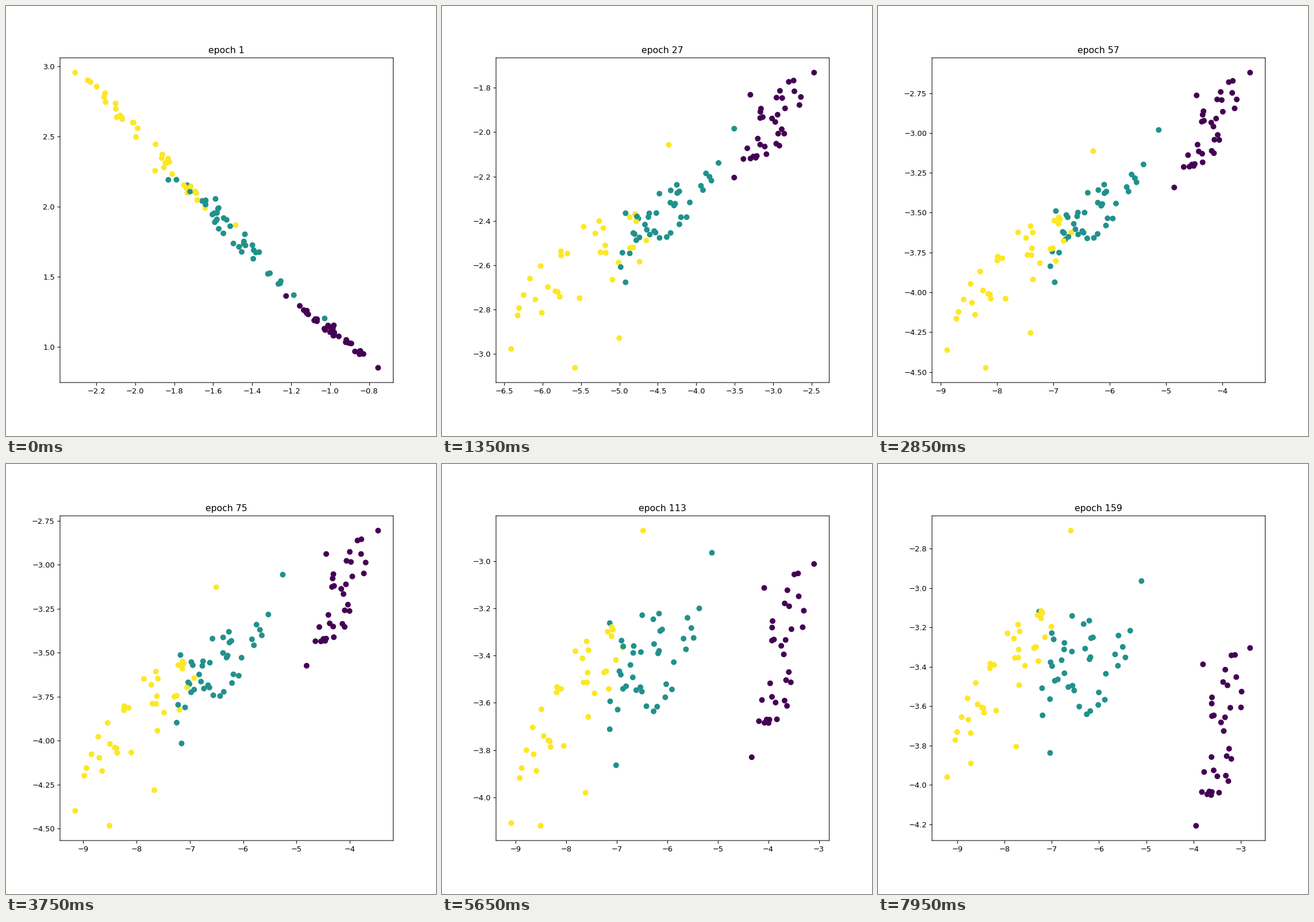
Recreate the animation shown at these times as a matplotlib script. Size 748 px wide and 748 px high, loop 8 s.

```python
import numpy as np
import matplotlib.pyplot as plt
from matplotlib.animation import FuncAnimation

STAGE, DPI = 748, 93.5
FRAMES, INTERVAL = 160, 50
KEY_EPOCHS = np.array([1, 27, 57, 93, 159], float)

# Each class rides on a triangle of outer points, one row per key epoch.
# A fourth point, where given, is a stray that moves on its own.
PURPLE = [
    [(-1.226, 1.363), (-0.754, 0.851), (-0.981, 1.154)],
    [(-3.506, -2.205), (-2.467, -1.731), (-3.296, -1.831)],
    [(-4.853, -3.342), (-3.505, -2.621), (-4.455, -2.764)],
    [(-4.505, -3.661), (-3.232, -2.878), (-4.209, -2.991)],
    [(-3.944, -4.208), (-2.800, -3.305), (-3.797, -3.388)],
]
TEAL = [
    [(-1.830, 2.192), (-1.028, 1.203), (-1.588, 2.056)],
    [(-4.919, -2.678), (-3.506, -1.984), (-4.919, -2.366)],
    [(-6.977, -3.937), (-5.129, -2.981), (-6.957, -3.490)],
    [(-7.000, -3.883), (-5.121, -2.967), (-7.077, -3.334)],
    [(-7.035, -3.838), (-5.100, -2.965), (-7.266, -3.120)],
]
YELLOW = [
    [(-2.308, 2.957), (-1.485, 1.868), (-1.898, 2.257), (-2.095, 2.639)],
    [(-6.407, -2.979), (-4.358, -2.057), (-5.001, -2.930), (-5.577, -3.064)],
    [(-8.888, -4.363), (-6.293, -3.114), (-7.407, -4.255), (-8.203, -4.474)],
    [(-9.024, -4.187), (-6.418, -2.949), (-7.549, -4.068), (-8.407, -4.234)],
    [(-9.215, -3.961), (-6.596, -2.709), (-7.753, -3.806), (-8.714, -3.891)],
]

rng = np.random.default_rng(7)


def cloud(controls, count, center, spread, slope):
    """Control points plus a seeded ellipse of points tied to the triangle."""
    controls = np.array(controls)
    n = count - controls.shape[1]
    radius, angle = np.sqrt(rng.random(n)), 2 * np.pi * rng.random(n)
    du = spread[0] * radius * np.cos(angle)
    dv = spread[1] * radius * np.sin(angle) + slope * du
    u, v = (center[0] + du)[:, None], (center[1] + dv)[:, None]
    a, b, c = (controls[:, k:k + 1] for k in range(3))
    return np.concatenate([controls, a + u * (b - a) + v * (c - a)], axis=1)


classes = [
    (cloud(PURPLE, 34, (0.48, 0.04), (0.40, 0.50), -0.5), "#440154"),
    (cloud(TEAL, 41, (0.37, 0.20), (0.50, 0.40), -0.8), "#21918c"),
    (cloud(YELLOW, 37, (0.40, 0.12), (0.30, 0.50), 0.0), "#fde725"),
]
keys = np.concatenate([points for points, _ in classes], axis=1)
colors = np.concatenate([[color] * points.shape[1] for points, color in classes])
order = rng.permutation(len(colors))
keys, colors = keys[:, order], colors[order]
slopes = np.gradient(keys, KEY_EPOCHS, axis=0)


def points_at(epoch):
    """Cubic Hermite interpolation between the keys."""
    i = min(np.searchsorted(KEY_EPOCHS, epoch, side="right") - 1, len(KEY_EPOCHS) - 2)
    h = KEY_EPOCHS[i + 1] - KEY_EPOCHS[i]
    t = (epoch - KEY_EPOCHS[i]) / h
    blend = t * t * (3 - 2 * t)
    return ((1 - blend) * keys[i] + blend * keys[i + 1]
            + h * t * (1 - t) * ((1 - t) * slopes[i] - t * slopes[i + 1]))


fig, ax = plt.subplots(figsize=(STAGE / DPI, STAGE / DPI), dpi=DPI)
fig.subplots_adjust(left=94 / STAGE, right=673.6 / STAGE,
                    bottom=1 - 655 / STAGE, top=1 - 90.2 / STAGE)
for spine in ax.spines.values():
    spine.set_snap(False)
dots = ax.scatter(*keys[0].T, s=44, c=colors)
title = ax.set_title("epoch 1")


def draw(frame):
    epoch = max(1, frame)
    points = points_at(epoch)
    low, high = points.min(axis=0), points.max(axis=0)
    margin = 0.05 * (high - low)
    dots.set_offsets(points)
    ax.set_xlim(low[0] - margin[0], high[0] + margin[0])
    ax.set_ylim(low[1] - margin[1], high[1] + margin[1])
    title.set_text(f"epoch {epoch}")
    return dots, title


anim = FuncAnimation(fig, draw, frames=FRAMES, interval=INTERVAL,
                     init_func=lambda: draw(0), repeat=True, repeat_delay=0)
plt.show()
```
